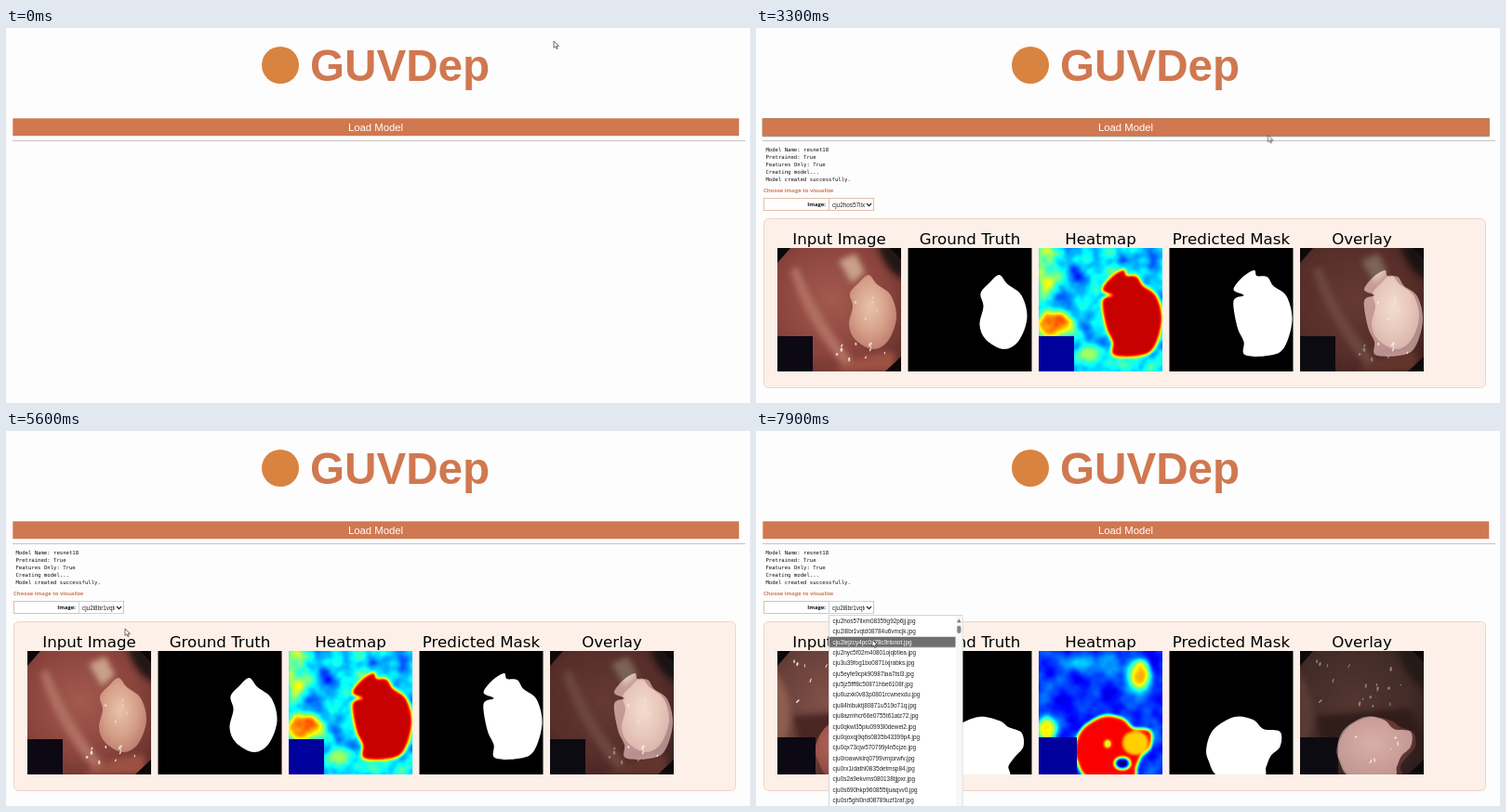
These frames come from a looping animation (800x404 px, 8 s). An HTML page:

```html
<!DOCTYPE html>
<html lang="en">
<head>
<meta charset="utf-8">
<title>Segmentation demo</title>
<style>
html, body { margin: 0; width: 100%; height: 100%; overflow: hidden; background: #fdfdfd; }
#stage { display: block; width: 800px; height: 404px; }
text { white-space: pre; }
.brand { font: bold 47.6px "Liberation Sans", Arial, sans-serif; fill: #d07850; }
.button { font: 11.3px "Liberation Sans", Arial, sans-serif; fill: #fff; text-anchor: middle; }
.log { font: 5.63px "DejaVu Sans Mono", monospace; fill: #111; }
.label { font: bold 5.88px "Open Sans", sans-serif; }
.option { font: 6.38px "Liberation Sans", Arial, sans-serif; fill: #222; }
.heading { font: 16.65px "DejaVu Sans", sans-serif; text-anchor: middle; }

/* Hard changes: each element names its keyframes in --k. */
.step { animation: var(--k) 8s step-end infinite; }
.pointer { animation: move 8s ease-in-out infinite; }

@keyframes focus { 0% { opacity: 0 } 21.25% { opacity: 1 } 54% { opacity: 0 } }
@keyframes line { 0% { opacity: 0 } 30% { opacity: 1 } }
@keyframes done { 0% { opacity: 0 } 33.6% { opacity: 1 } }
@keyframes form { 0% { opacity: 0 } 40% { opacity: 1 } }
@keyframes panel { 0% { opacity: 0 } 41.2% { opacity: 1 } }
@keyframes ring { 0% { opacity: 0 } 54% { opacity: 1 } }
@keyframes old { 0% { opacity: 1 } 70% { opacity: 0 } }
@keyframes new { 0% { opacity: 0 } 70% { opacity: 1 } }
@keyframes first { 0% { opacity: 1 } 72.5% { opacity: 0 } }
@keyframes second { 0% { opacity: 0 } 72.5% { opacity: 1 } }
@keyframes menu { 0% { opacity: 0 } 56.2% { opacity: 1 } 70% { opacity: 0 } 87.4% { opacity: 1 } }
@keyframes arrow { 0% { opacity: 1 } 21.25% { opacity: 0 } 41.2% { opacity: 1 } }
@keyframes hand { 0% { opacity: 0 } 21.25% { opacity: 1 } 41.2% { opacity: 0 } }
@keyframes mark {
  0% { transform: none }
  65% { transform: translateY(11.37px) }
  97% { transform: translateY(22.74px) }
}
@keyframes pick0 { 0% { fill: #fff } 65% { fill: #222 } }
@keyframes pick1 { 0% { fill: #222 } 65% { fill: #fff } 97% { fill: #222 } }
@keyframes pick2 { 0% { fill: #222 } 97% { fill: #fff } }
@keyframes move {
  0%, 3.75% { transform: translate(589px, 14px) }
  15%, 17.5% { transform: translate(575px, 47px) }
  23.75%, 40% { transform: translate(564px, 112px) }
  48.75% { transform: translate(238px, 192px) }
  53.75%, 62.5% { transform: translate(124px, 191px) }
  66%, 71% { transform: translate(128px, 213px) }
  76%, 84% { transform: translate(134px, 207px) }
  87%, 91% { transform: translate(119px, 193px) }
  98.5%, 100% { transform: translate(125px, 225px) }
}
</style>
</head>
<body>
<svg id="stage" viewBox="0 0 800 404" xmlns="http://www.w3.org/2000/svg">
  <defs>
    <filter id="soft" x="-30%" y="-30%" width="160%" height="160%"><feGaussianBlur stdDeviation="3"/></filter>
    <!-- Maps a gray field to the jet colour scale. -->
    <filter id="jet" filterUnits="userSpaceOnUse" x="-20" y="-20" width="173" height="173" color-interpolation-filters="sRGB">
      <feGaussianBlur stdDeviation="1.8"/>
      <feComponentTransfer>
        <feFuncR type="table" tableValues="0 0 0 0 .5 1 1 1 .5"/>
        <feFuncG type="table" tableValues="0 0 .5 1 1 1 .5 0 0"/>
        <feFuncB type="table" tableValues=".5 1 1 1 .5 0 0 0 0"/>
      </feComponentTransfer>
    </filter>
  </defs>

  <rect width="800" height="404" fill="#fdfdfd"/>
  <circle cx="295" cy="40" r="20" fill="#d98340"/>
  <text class="brand" x="327" y="57">GUVDep</text>

  <rect class="step" style="--k:focus" x="6.5" y="97" width="782.5" height="20.2" rx="1" fill="#9c9792"/>
  <rect x="7.3" y="97.3" width="780.9" height="18.9" fill="#d07850"/>
  <text class="button" x="397.5" y="110.5">Load Model</text>
  <rect x="7" y="121" width="788" height="1" fill="#c4c4c4"/>

  <g id="log" class="log"></g>

  <g class="step" style="--k:form">
    <text class="label" x="8" y="177" fill="#d07850">Choose image to visualize</text>
    <rect x="8.5" y="183.5" width="118" height="13" fill="#fff" stroke="#e6bda9"/>
    <path d="M78.5 184V196" stroke="#e6bda9"/>
    <path class="step" style="--k:ring" d="M126 183.5H78.5V196.5H126" fill="none" stroke="#c3d6e4"/>
    <text class="label" x="75" y="192.3" text-anchor="end" fill="#111">Image:</text>
    <svg x="80" y="184" width="36.5" height="12">
      <text class="option step" style="--k:old" x="2" y="8.6">cju2hos57llxm</text>
      <text class="option step" style="--k:new" x="2" y="8.6">cju2i8br1vqtd</text>
    </svg>
    <path d="M119 189L121.5 191.6L124 189" fill="none" stroke="#222" stroke-width="1.2"/>
  </g>

  <g class="step" style="--k:panel">
    <rect x="8.5" y="205.5" width="776" height="182" rx="5" fill="#fcf0e8" stroke="#f2d3c2"/>
    <g id="headings"></g>
    <g id="first" class="step" style="--k:first"></g>
    <g id="second" class="step" style="--k:second"></g>
  </g>

  <g class="step" style="--k:menu">
    <rect x="78.5" y="198.5" width="143.5" height="210" fill="#fff" stroke="#d5d5d5"/>
    <rect x="215" y="199" width="6.5" height="205" fill="#f7f7f7"/>
    <path d="M216 206.2L218.3 202.6L220.6 206.2Z" fill="#777"/>
    <rect x="216.2" y="209.8" width="4.2" height="8.2" rx="2" fill="#888"/>
    <rect class="step" style="--k:mark" x="79" y="199" width="135.5" height="11.3" fill="#6f6f6f"/>
    <g id="rows"></g>
  </g>

  <g class="pointer">
    <path class="step" style="--k:arrow" d="M0 0V7.4L1.8 5.8L3 8.6L4.2 8L3 5.4H5.4Z" fill="#fff" stroke="#333" stroke-width=".7"/>
    <path class="step" style="--k:hand" d="M0 .8Q.8 -.3 1.5 .8V4L4.3 4.6Q5 4.9 4.8 6.2L4 9.8H-.2L-2.7 6.4Q-2.6 5.3 -1.5 5.8L0 6.9Z" fill="#fff" stroke="#333" stroke-width=".7"/>
  </g>
</svg>
<script>
const SIZE = 133, TOP = 237;
const tileX = i => 23 + 140.5 * i;
const fill = (id, markup) => { document.getElementById(id).innerHTML = markup; };
const cover = (paint, opacity = 1) => `<rect x="-20" y="-20" width="173" height="173" fill="${paint}" opacity="${opacity}"/>`;
const gray = v => `rgb(${Array(3).fill(Math.round(v * 255))})`;
const spot = (x, y, rx, ry, v) => `<ellipse cx="${x}" cy="${y}" rx="${rx}" ry="${ry}" fill="${gray(v)}"/>`;

// Closed Catmull-Rom curve through a few "x,y" points.
function outline(text) {
  const pts = text.split(' ').map(p => p.split(',').map(Number));
  const at = i => pts[(i + pts.length) % pts.length];
  const lean = (a, b, c) => a.map((v, k) => (v + (c[k] - b[k]) / 6).toFixed(1));
  return `M${pts[0]}` + pts.map((p, i) =>
    `C${lean(p, at(i - 1), at(i + 1))} ${lean(at(i + 1), at(i + 2), p)} ${at(i + 1)}`).join('') + 'Z';
}

function seeded(seed) {
  return () => (seed = seed * 16807 % 2147483647) / 2147483647;
}

// Small bright reflections scattered inside a box.
function glints(seed, count, [x, y, w, h]) {
  const random = seeded(seed);
  return Array.from({ length: count }, () => {
    const cx = x + w * random(), cy = y + h * random();
    return `<ellipse cx="${cx}" cy="${cy}" rx="${.5 + random()}" ry="${1 + 1.8 * random()}"
      transform="rotate(${70 * random() - 20} ${cx} ${cy})" fill="#e9d6c8"/>`;
  }).join('');
}

const scenes = {
  first: {
    truth: outline('98,29 107,39 122,51 128,75 119,100 103,109 84,99 77,83 81,63 78,49 87,38'),
    guess: outline('91,24 94,30 105,31 112,41 126,52 132,78 123,108 106,116 81,115 80,101 73,85 69,57 80,51 69,45 78,32'),
    tissue: ['#a4594e', '#8a443d', '#452220'],
    polyp: ['#e9c3ab', '#d6a08a', '#b57164'],
    shade: `<path d="M14 24Q30 80 72 128L82 122Q44 76 22 20Z" fill="#b06f62"/>
      <path d="M108 -4H137V34Q116 26 108 -4Z" fill="#241312"/>
      <path d="M66 14L84 6L94 26L80 38Z" fill="#c9a08a"/>
      <path d="M60 133Q90 112 126 112V133Z" fill="#9c5142"/>`,
    shine: glints(5, 10, [64, 100, 56, 22]) + glints(9, 5, [84, 52, 24, 36]),
    blockTop: 95, blockWidth: 38,
    base: .34, noise: .55,
    warmth: spot(8, 22, 12, 26, .5) + spot(40, 22, 11, 26, .26) + spot(18, 82, 22, 13, .7) + spot(55, 112, 12, 9, .5),
    core: .93, details: ''
  },
  second: {
    truth: outline('76,71 98,75 108,82 122,88 124,103 115,114 108,124 106,136 58,136 44,119 41,103 52,82'),
    guess: outline('70,71 90,74 101,84 119,87 119,103 109,113 104,125 99,136 55,136 42,118 40,103 48,84'),
    tissue: ['#82524a', '#68403a', '#281615'],
    polyp: ['#bd756b', '#a65a51', '#803f39'],
    shade: `<path d="M-4 20Q24 54 8 100H-4Z" fill="#8d5d50"/>
      <path d="M16 70Q68 66 118 62L137 96V110L24 104Z" fill="#4a2824"/>
      <path d="M104 -4H137V44Q112 28 104 -4Z" fill="#35201d"/>`,
    shine: glints(23, 18, [18, 10, 96, 50]) + glints(31, 6, [60, 90, 48, 34]),
    blockTop: 93, blockWidth: 41,
    base: .17, noise: .3,
    warmth: spot(60, 14, 44, 9, .27) + spot(8, 84, 11, 12, .62) + spot(107, 27, 15, 20, .36) + spot(109, 26, 9, 15, .7),
    core: .88,
    details: spot(104, 99, 14, 13, .67) + spot(74, 100, 3.5, 4, .55) + spot(90, 121, 9, 7, .35) + spot(90, 121, 6, 4.5, 0)
  }
};

const radial = (id, colors) => `<radialGradient id="${id}" cx=".45" cy=".43" r=".7">${
  colors.map((c, i) => `<stop offset="${i / 2}" stop-color="${c}"/>`).join('')}</radialGradient>`;

const grain = (id, noise) => `<filter id="${id}" filterUnits="userSpaceOnUse" x="-20" y="-20" width="173" height="173" color-interpolation-filters="sRGB">
  <feTurbulence type="fractalNoise" baseFrequency=".045" numOctaves="3" seed="7"/>
  <feColorMatrix values="1 0 0 0 0 1 0 0 0 0 1 0 0 0 0 0 0 0 0 1" result="grain"/>
  <feComposite in="SourceGraphic" in2="grain" operator="arithmetic" k2="1" k3="${noise}" k4="${-noise / 2}"/></filter>`;

function drawScene(id, s) {
  const block = paint => `<rect y="${s.blockTop}" width="${s.blockWidth}" height="${SIZE - s.blockTop}" fill="${paint}"/>`;
  const shape = (d, paint, extra = '') => `<path d="${d}" fill="${paint}" ${extra}/>`;
  const mask = d => cover('#000') + shape(d, '#fff');
  const photo = `${cover(`url(#${id}Tissue)`)}<g filter="url(#soft)">${s.shade}</g>
    ${shape(s.truth, `url(#${id}Polyp)`)}${s.shine}
    <path d="M0 0H14L0 16ZM121 0H133V12ZM133 117V133H116Z" fill="#0b0708"/>${block('#0c0814')}`;
  const heat = `<g filter="url(#jet)">
    <g filter="url(#${id}Grain)">${cover(gray(s.base))}<g filter="url(#soft)">${s.warmth}</g></g>
    ${shape(s.guess, gray(.62), `stroke="${gray(.62)}" stroke-width="4"`)}
    ${shape(s.guess, gray(s.core))}${s.details}</g>${block('#00009c')}`;
  const overlay = `${photo}${cover('#10100f', .42)}
    <clipPath id="${id}Clip">${shape(s.guess, '#000')}</clipPath>
    <g clip-path="url(#${id}Clip)">${photo}${cover('#fff', .42)}</g>`;

  const defs = radial(id + 'Tissue', s.tissue) + radial(id + 'Polyp', s.polyp) + grain(id + 'Grain', s.noise);
  fill(id, defs + [photo, mask(s.truth), heat, mask(s.guess), overlay].map((tile, i) =>
    `<svg x="${tileX(i)}" y="${TOP}" width="${SIZE}" height="${SIZE}">${tile}</svg>`).join(''));
}
for (const id in scenes) drawScene(id, scenes[id]);

fill('headings', ['Input Image', 'Ground Truth', 'Heatmap', 'Predicted Mask', 'Overlay'].map((name, i) =>
  `<text class="heading" x="${tileX(i) + SIZE / 2}" y="233">${name}</text>`).join(''));

fill('log', ['Model Name: resnet18', 'Pretrained: True', 'Features Only: True', 'Creating model...', 'Model created successfully.']
  .map((line, i) => `<text class="step" style="--k:${i < 4 ? 'line' : 'done'}" x="10.4" y="${133 + 8 * i}">${line}</text>`).join(''));

const files = `2hos57llxm08359g92p6jj 2i8br1vqtd08784u6vmcjk 2lejzcy4pc0878c9rlonot 2nyc5f02m40801ojqbtiea
  3u39fog1bo0871lxjrabks 5eyfe9cpk90987laa7tsl3 5jz5fff8c50871hbe6108f 6uzxk0v83p0801rcwnexdu 84hibuktj80871u519o71q
  8azmhcr66e0755t61atz72 0qkwl35piu0993l0dewei2 0qoxqj9q6s0835b43399p4 0qx73cjw570799j4n5cjze 0roawvklrq0799vmjorwfv
  0rx1idathl0835detmsp84 0s2a9ekvms080138tjjpxr 0s690hkp960855tjuaqvv0 0sr5ghl0nd08789uzf1raf`.split(/\s+/);
fill('rows', files.map((name, i) =>
  `<text class="option step" style="--k:pick${i}" x="82.5" y="${206.9 + 11.37 * i}">cju${name}.jpg</text>`).join(''));
</script>
</body>
</html>
```
